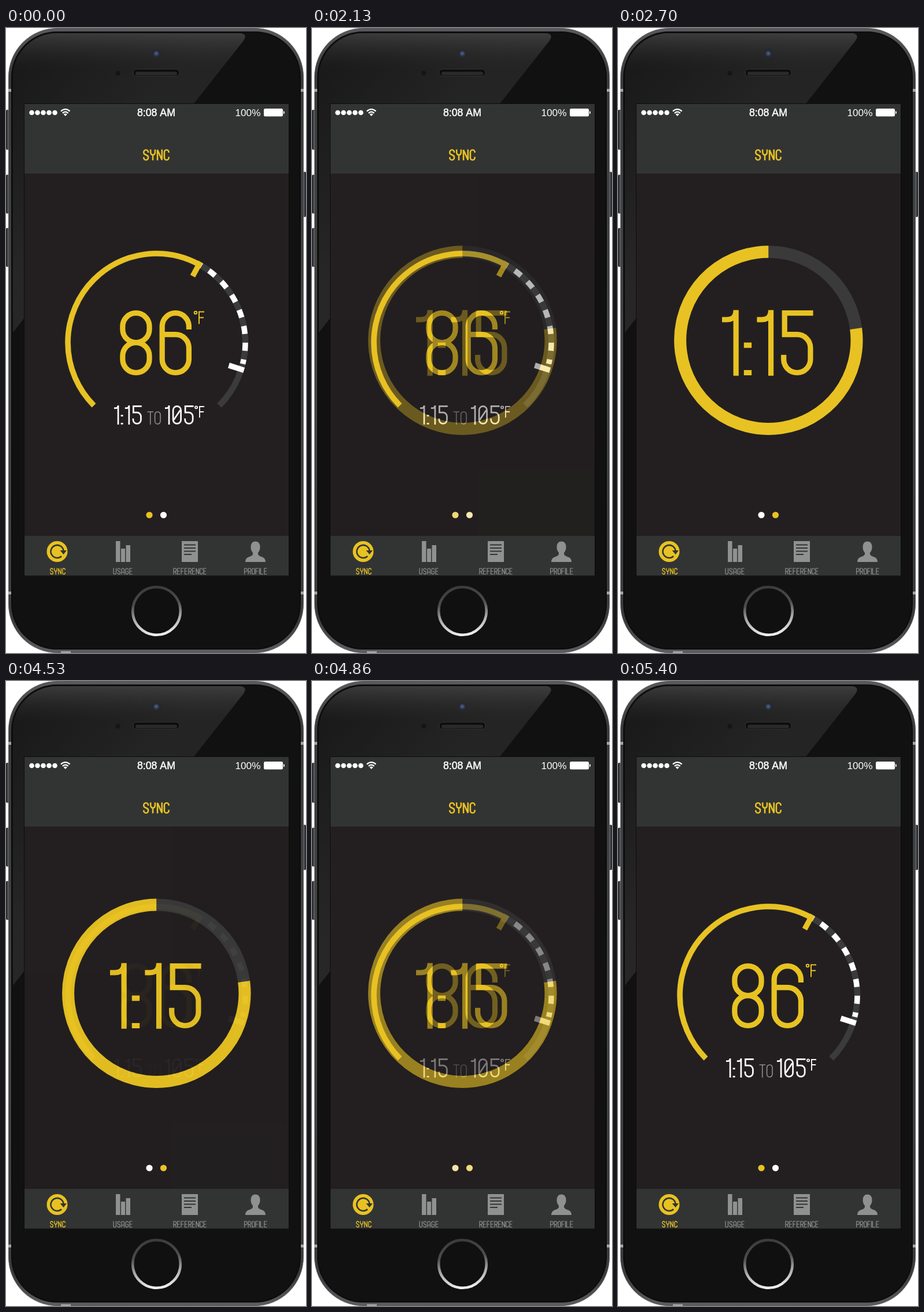
An HTML page for the animation above (5430 ms loop, 519 by 1078 pixels).

```html
<!DOCTYPE html>
<html lang="en">
<head>
<meta charset="utf-8">
<title>Sync screen</title>
<style>
  html, body { margin: 0; width: 100%; height: 100%; overflow: hidden; background: #fff; }
  svg { display: block; width: 100%; height: 100%; }
  .status { font-family: "Liberation Sans", Arial, sans-serif; fill: #fff; }
  .type path { fill: none; stroke: currentColor; stroke-linejoin: miter; }
  .line { fill: none; }
  .gold { color: #e8c222; }
  .white { color: #fff; }
  .grey { color: #8f9090; }
  .timer { animation: fade 5430ms infinite; }
  /* 30 equal opacity steps in each direction */
  @keyframes fade {
    0% { opacity: 0; }
    33.701% { opacity: 0; animation-timing-function: steps(30, jump-start); }
    50.276% { opacity: 1; }
    83.425% { opacity: 1; animation-timing-function: steps(30, jump-start); }
    100% { opacity: 0; }
  }
</style>
</head>
<body>
<svg viewBox="0 0 519 1078" preserveAspectRatio="none">
  <defs>
    <linearGradient id="rim" x2="0" y2="1">
      <stop offset="0" stop-color="#58595b"/>
      <stop offset=".07" stop-color="#3a3b3d"/>
      <stop offset=".5" stop-color="#434446"/>
      <stop offset=".95" stop-color="#3a3b3d"/>
      <stop offset="1" stop-color="#5c5d60"/>
    </linearGradient>
    <linearGradient id="glare" gradientUnits="userSpaceOnUse" x1="70" y1="20" x2="235" y2="150">
      <stop offset="0" stop-color="#1a1a1b"/>
      <stop offset="1" stop-color="#272728"/>
    </linearGradient>
    <linearGradient id="shade" x2="0" y2="1">
      <stop offset="0" stop-color="#434344" stop-opacity=".8"/>
      <stop offset=".12" stop-color="#1b1b1b" stop-opacity=".25"/>
      <stop offset="1" stop-color="#1b1b1b" stop-opacity="0"/>
    </linearGradient>
    <linearGradient id="key" x2="1">
      <stop offset="0" stop-color="#1c1d1e"/>
      <stop offset=".5" stop-color="#5b5c5f"/>
      <stop offset="1" stop-color="#1c1d1e"/>
    </linearGradient>
    <linearGradient id="steel" x1=".45" y1="0" x2=".55" y2="1">
      <stop offset="0" stop-color="#3c3c3d"/>
      <stop offset=".35" stop-color="#4c4c4d"/>
      <stop offset=".65" stop-color="#a8a8a9"/>
      <stop offset="1" stop-color="#f0f0f0"/>
    </linearGradient>
    <radialGradient id="lens">
      <stop offset="0" stop-color="#5570a4"/>
      <stop offset=".5" stop-color="#34405c"/>
      <stop offset="1" stop-color="#25272c"/>
    </radialGradient>
    <clipPath id="face"><rect x="12" y="9" width="495" height="1060" rx="76"/></clipPath>
  </defs>

  <!-- phone -->
  <g fill="url(#key)">
    <rect y="141" width="8" height="69" rx="2"/>
    <rect y="253" width="8" height="67" rx="2"/>
    <rect y="345" width="8" height="67" rx="2"/>
    <rect x="511" y="248" width="8" height="78" rx="2"/>
  </g>
  <rect x="4.5" y=".5" width="510" height="1077" rx="84" fill="url(#rim)" stroke="#5c5d60"/>
  <g fill="#a4a5a7">
    <rect x="4" y="105" width="7" height="5"/>
    <rect x="508" y="105" width="7" height="5"/>
    <rect x="4" y="972" width="7" height="5"/>
    <rect x="508" y="972" width="7" height="5"/>
    <rect x="95" y="1075" width="17" height="3"/>
  </g>
  <rect x="10" y="7" width="499" height="1064" rx="78" fill="#111112" stroke="#0b0b0b" stroke-width="2"/>
  <g clip-path="url(#face)">
    <path d="M12 9H402Q420 9 410 23L12 525Z" fill="url(#glare)"/>
    <path d="M12 9H402Q420 9 410 23L12 525Z" fill="url(#shade)"/>
  </g>
  <circle cx="260" cy="44" r="8" fill="#25272b"/>
  <circle cx="260" cy="44" r="6" fill="url(#lens)"/>
  <circle cx="193.500" cy="78" r="4" fill="#151516"/>
  <rect x="220" y="71" width="80" height="12" rx="6" fill="#0d0d0e" stroke="#343436"/>
  <rect x="224" y="75.500" width="72" height="6" rx="3" fill="#2a2a2c"/>
  <circle cx="260.500" cy="1005.500" r="43.500" fill="#0a0a0b"/>
  <circle cx="260.500" cy="1005.500" r="41.300" fill="#101011" stroke="url(#steel)" stroke-width="4.600"/>

  <!-- screen -->
  <rect x="31" y="130" width="459" height="815" fill="#0c0c0c"/>
  <rect x="32" y="131" width="457" height="813.500" fill="#323433"/>
  <rect x="32" y="251" width="457" height="625" fill="#231f20"/>

  <!-- status bar -->
  <g fill="#fff">
    <circle cx="44.500" cy="146" r="4.300"/>
    <circle cx="54.500" cy="146" r="4.300"/>
    <circle cx="64.500" cy="146" r="4.300"/>
    <circle cx="74.500" cy="146" r="4.300"/>
    <circle cx="84.500" cy="146" r="4.300"/>
    <path d="M102.700 152l-3.100-3.300q3.100-2.500 6.200 0z"/>
    <path class="line" stroke="#fff" stroke-width="2.200" d="M94.900 143.600q7.800-6.900 15.600 0M97.800 146.800q4.900-4.200 9.800 0"/>
    <rect x="446" y="139" width="33" height="13.500" rx="2.500"/>
    <path d="M480 143q2 .6 2 2.700t-2 2.700z"/>
  </g>
  <g class="status">
    <text x="227" y="151.700" font-size="17.700" stroke="#fff" stroke-width=".5" word-spacing="1">8:08 AM</text>
    <text x="396.500" y="151.700" font-size="17.200">100%</text>
  </g>

  <!-- tab bar -->
  <circle cx="88.500" cy="903" r="18" fill="#e8c222"/>
  <path class="line" stroke="#323433" stroke-width="2.600" d="M96 911A11 11 0 1 1 99.500 902"/>
  <path fill="#323433" d="M93.500 901h11.500l-5.500 7z"/>
  <g fill="#8f9090">
    <path d="M190 885h7.500v36h-7.500zM199 898h7v23h-7zM207.500 892h7.500v29h-7.500z"/>
    <path d="M304 885h28v36h-28z"/>
    <path d="M414 921q0-7 7-9 6-2 6-5v-2q-3-3-3.500-8.500-.5-11 8-11t8 11q-.5 5.500-3.500 8.500v2q0 3 6 5 7 2 7 9z"/>
  </g>
  <path stroke="#323433" stroke-width="2" d="M308 891.500h20M308 897h20M308 902.500h20M308 908h13"/>

  <!-- temperature -->
  <g class="line" stroke-width="9.500" transform="translate(260.500 542.500)">
    <g transform="rotate(-90)">
      <circle r="153.500" pathLength="360" stroke="#3b3b3c" stroke-width="10.500" stroke-dasharray="270 90" transform="rotate(-135)"/>
      <circle r="153.500" pathLength="360" stroke="#e8c222" stroke-dasharray="163.500 196.500" transform="rotate(-135)"/>
      <circle r="153.500" pathLength="360" stroke="#fff" transform="rotate(30)"
        stroke-dasharray=".6 5.500 5.200 5.600 5.200 5.600 5.200 5.600 5.200 5.600 5.200 5.600 5.200 5.600 3 400"/>
    </g>
    <path stroke="#e8c222" d="M0-158.500V-130.500" transform="rotate(28.600)"/>
    <path stroke="#fff" d="M0-158.500V-131" transform="rotate(107.500)"/>
  </g>
  <g id="temp"></g>
  <circle cx="248" cy="840" r="5.600" fill="#e8c222"/>
  <circle cx="272.500" cy="840" r="5.600" fill="#fff"/>

  <!-- timer -->
  <g class="timer">
    <rect x="32" y="251" width="457" height="625" fill="#231f20"/>
    <g class="line" stroke-width="21" transform="translate(260.300 538.700) rotate(-90)">
      <circle r="152.700" stroke="#3a3a3a"/>
      <circle r="152.700" pathLength="360" stroke="#e8c222" stroke-dasharray="277.600 82.400" transform="rotate(82.400)"/>
    </g>
    <g id="time"></g>
    <circle cx="248" cy="840" r="5.600" fill="#fff"/>
    <circle cx="272.500" cy="840" r="5.600" fill="#e8c222"/>
  </g>
  <g id="labels"></g>
</svg>
<script>
  // Condensed stroke lettering: centre lines in a 9 x 20 box
  const arch = 'a4.5 4.5 0 0 0-9 0', cup = 'a4.5 4.5 0 0 0 9 0';
  const ring = (y, h) => `M9 ${y + 4.5}${arch}v${h - 9}${cup}z`;
  const bowl = 'M0 0H4.5a4.5 4.5 0 0 1 4.5 4.5v2a4.5 4.5 0 0 1-4.5 4.5H0';
  const hook = `M9 5.5V4.5${arch}v11${cup}`;
  const glyphs = {
    0: ring(0, 20) + 'M.8 15.5L8.2 4.5',
    1: 'M0 2.2H1.5Q4.7 2.2 4.7-1V21',
    5: `M9.9 0H.3V7.2H4.5a4.5 4.5 0 0 1 4.5 4.5v3.8a4.5 4.5 0 0 1-9 0V14`,
    6: hook + 'v-3.8a4.5 4.5 0 0 0-4.5-4.5H0',
    8: ring(0, 9.9) + ring(9.9, 10.1),
    ':': 'M-1.65 10.8H.95M-1.65 20H.95',
    '°': 'M4.6 1.5a2.3 2.3 0 1 0-4.6 0a2.3 2.3 0 1 0 4.6 0z',
    A: `M0 21V4.5a4.5 4.5 0 0 1 9 0V21M0 13H9`,
    C: hook + 'V14',
    E: 'M9 0H0V20H9M0 10H8',
    F: 'M9 0H0V21M0 10H8',
    G: hook + 'V11H4.5',
    I: 'M0-1V21',
    L: 'M0-1V20H9',
    N: 'M0 21V0L9 20V-1',
    O: ring(0, 20),
    P: bowl + 'M0-1V21',
    R: bowl + 'M0-1V21M5 11L9 21',
    S: `M9 5.5V4.5${arch}v1Q0 8 3 9.3L6 10.7Q9 12 9 14.5v1a4.5 4.5 0 0 1-9 0v-1`,
    T: 'M-.5 0H9.5M4.5 0V21',
    U: `M0-1V15.5${cup}V-1`,
    Y: 'M0-1V4Q0 10 4.5 10T9 4V-1M4.5 10V21'
  };
  const widths = { 1: 4.7, ':': -1.55, '°': 4.6, I: 0 };

  function letter(id, text, x, y, size, weight, gap, color) {
    let at = 0, marks = '';
    for (const ch of text) {
      marks += `<path d="${glyphs[ch]}" transform="translate(${at})"/>`;
      at += (widths[ch] ?? 9) + gap;
    }
    document.getElementById(id).insertAdjacentHTML('beforeend',
      `<g class="type ${color}" role="img" aria-label="${text}" stroke-width="${weight / size}"
        transform="translate(${x} ${y}) scale(${size})">${marks}</g>`);
  }

  letter('temp', '86', 201.8, 491.7, 5.14, 9.2, 4.3, 'gold');
  letter('temp', '°F', 325.7, 489.5, 1, 2, 3.7, 'gold');
  letter('temp', '1:15', 187, 652.4, 1.5, 2.7, 4.7, 'white');
  letter('temp', '105', 275, 652.4, 1.5, 2.7, 4.7, 'white');
  letter('temp', '°F', 327, 653, 0.9, 1.8, 4.2, 'white');
  letter('temp', 'TO', 245, 662, 1.05, 1.6, 3, 'grey');
  letter('time', '1:15', 180, 491.7, 5.14, 9.2, 4.3, 'gold');
  letter('labels', 'SYNC', 238.3, 210.3, 0.86, 2.6, 4.8, 'gold');
  letter('labels', 'SYNC', 76.8, 932, 0.5, 1.3, 5, 'gold');
  letter('labels', 'USAGE', 186, 932, 0.5, 1.2, 5, 'grey');
  letter('labels', 'REFERENCE', 290, 932, 0.5, 1.2, 4, 'grey');
  letter('labels', 'PROFILE', 412.7, 932, 0.5, 1.2, 3.9, 'grey');
</script>
</body>
</html>
```
